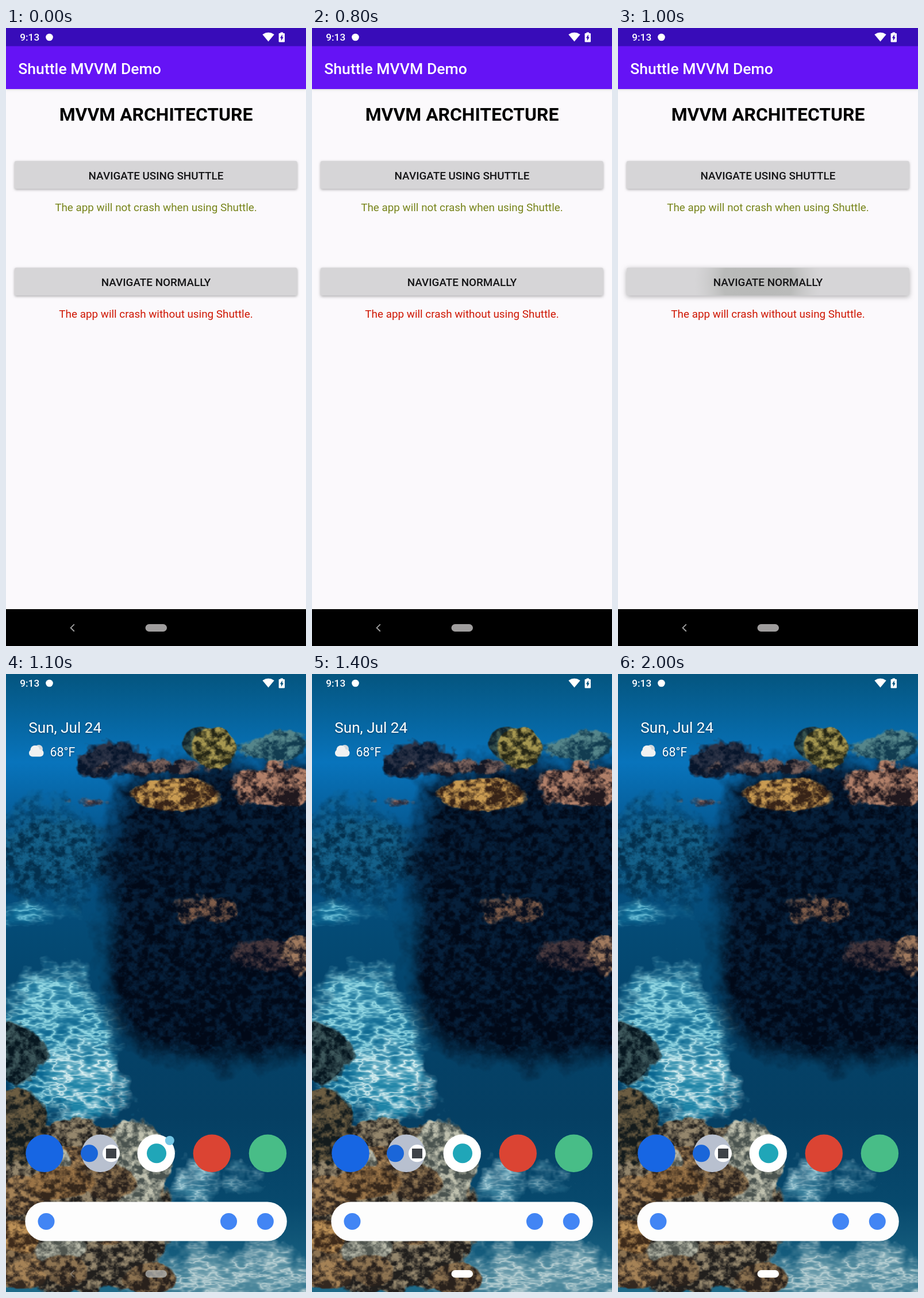
Write an HTML page with a canvas that moves like this. It is 522x1073 px and loops after 2700 ms.

```html
<!DOCTYPE html>
<html lang="en">
<head>
<meta charset="utf-8">
<title>Navigation demo</title>
<style>
  html, body { margin: 0; width: 100%; height: 100%; overflow: hidden; background: #000; }
  canvas, svg { position: absolute; left: 0; top: 0; width: 522px; height: 1073px; }
  text { font-family: Roboto, sans-serif; white-space: pre; }
  .mid { text-anchor: middle; }
  .body { font-size: 18.85px; }
  .button { font-size: 18.85px; font-weight: 500; fill: #141416; }
  #home text { fill: #fff; filter: drop-shadow(0 1px 1.5px rgba(0, 0, 0, .4)); }
</style>
</head>
<body>
<canvas id="stage" width="522" height="1073"></canvas>
<svg viewBox="0 0 522 1073">
  <text x="24.3" y="22" font-size="17.2" font-weight="500" fill="#fff">9:13</text>
  <g id="app">
    <text x="21.3" y="80" font-size="26.6" font-weight="500" fill="#fff">Shuttle MVVM Demo</text>
    <text class="mid" x="261" y="161.4" font-size="31.9" font-weight="700">MVVM ARCHITECTURE</text>
    <text class="mid button" x="261" y="262.6">NAVIGATE USING SHUTTLE</text>
    <text class="mid body" x="261" y="318" fill="#77841a">The app will not crash when using Shuttle.</text>
    <text class="mid button" x="261" y="447.6">NAVIGATE NORMALLY</text>
    <text class="mid body" x="261" y="503" fill="#cf1703">The app will crash without using Shuttle.</text>
  </g>
  <g id="home">
    <text x="39.3" y="101.5" font-size="26.1">Sun, Jul 24</text>
    <text x="76.5" y="142.5" font-size="21.3">68°F</text>
  </g>
</svg>
<script>
const W = 522, H = 1073, LOOP = 2700, CRASH = 1100;
const stage = document.getElementById('stage');
const appText = document.getElementById('app');
const homeText = document.getElementById('home');
const ctx = stage.getContext('2d');

const clamp = v => Math.max(0, Math.min(1, v));
const mix = (a, b, t) => a + (b - a) * t;
const rgb = hex => [1, 3, 5].map(i => parseInt(hex.slice(i, i + 2), 16));

function disc(x, y, r, fill) {
  ctx.fillStyle = fill;
  ctx.beginPath();
  ctx.arc(x, y, r, 0, Math.PI * 2);
  ctx.fill();
}

function box(x, y, w, h, r, fill) {
  ctx.fillStyle = fill;
  ctx.beginPath();
  ctx.roundRect(x, y, w, h, r);
  ctx.fill();
}

function withShadow(color, blur, dy, draw) {
  ctx.save();
  ctx.shadowColor = color;
  ctx.shadowBlur = blur;
  ctx.shadowOffsetY = dy;
  draw();
  ctx.restore();
}

function random(seed) {
  return () => {
    seed = (seed * 1664525 + 1013904223) >>> 0;
    return seed / 4294967296;
  };
}

// Smooth value noise on a wrapped grid
const rnd = random(7);
const GRID = 256;
const lattice = Float32Array.from({ length: GRID * GRID }, rnd);

function noise(x, y) {
  const ix = Math.floor(x), iy = Math.floor(y);
  const ease = v => v * v * (3 - 2 * v);
  const fx = ease(x - ix), fy = ease(y - iy);
  const at = (i, j) => lattice[(j % GRID) * GRID + i % GRID];
  return mix(mix(at(ix, iy), at(ix + 1, iy), fx), mix(at(ix, iy + 1), at(ix + 1, iy + 1), fx), fy);
}

function fractal(x, y, octaves) {
  let sum = 0, total = 0;
  for (let k = 0; k < octaves; k++) {
    const amp = .55 ** k;
    sum += amp * noise(x * 2 ** k + k * 17, y * 2 ** k + k * 31);
    total += amp;
  }
  return sum / total;
}

function field(f) {
  return Float32Array.from({ length: W * H }, (_, i) => f(i % W, Math.floor(i / W)));
}

// Underwater scene in soft noisy patches, painted once
function paintReef() {
  const reef = document.createElement('canvas');
  reef.width = W;
  reef.height = H;
  const c = reef.getContext('2d');
  const water = ['#04557f', '#0874bc', '#055084', '#044a74', '#044268', '#053f63', '#07496d', '#1f6a88'];
  const g = c.createLinearGradient(0, 0, 0, H);
  water.forEach((color, i) => g.addColorStop(i / (water.length - 1), color));
  c.fillStyle = g;
  c.fillRect(0, 0, W, H);
  const image = c.getImageData(0, 0, W, H);

  const edge = field((x, y) => 3 * (fractal(x / 34, y / 34, 4) - .5));
  const grain = field((x, y) => .45 + 2.6 * (fractal(x / 9, y / 8, 3) - .5));
  const caustic = field((x, y) => (1 - Math.abs(2 * fractal(x / 24, y / 9, 3) - 1)) ** 4);

  // Rough ellipse, lit from above; a higher power makes it boxier
  function patch(x, y, rx, ry, dark, light, { rough = 12, soft = 5, power = 2, texture = grain } = {}) {
    const r = Math.min(rx, ry), reach = 1 + (rough + soft) / r;
    const a = rgb(dark), b = rgb(light);
    const x0 = Math.max(0, Math.floor(x - rx * reach)), x1 = Math.min(W, x + rx * reach);
    const y0 = Math.max(0, Math.floor(y - ry * reach)), y1 = Math.min(H, y + ry * reach);
    for (let py = y0; py < y1; py++) {
      for (let px = x0; px < x1; px++) {
        const i = py * W + px;
        const dx = Math.abs(px - x) / rx, dy = Math.abs(py - y) / ry;
        const inside = (1 - (dx ** power + dy ** power) ** (1 / power)) * r + rough * edge[i];
        const alpha = clamp(inside / soft);
        if (!alpha) continue;
        const t = clamp(texture[i] - .2 * (py - y) / ry);
        for (let k = 0; k < 3; k++) {
          const p = i * 4 + k;
          image.data[p] = mix(image.data[p], mix(a[k], b[k], t), alpha);
        }
      }
    }
  }

  const haze = { rough: 30, soft: 50 };
  const sand = { rough: 30, soft: 40, texture: caustic };

  // Water, distant reef and lit sand
  patch(60, 310, 150, 100, '#03304e', '#146089', haze);
  patch(40, 415, 75, 25, '#0b6792', '#6fc3da', { rough: 10, soft: 20, texture: caustic });
  patch(85, 650, 130, 145, '#0a6690', '#8fd5e1', sand);
  patch(130, 710, 95, 75, '#1d83a6', '#d9f0f1', sand);
  patch(350, 885, 75, 40, '#3d84a0', '#b8dce3', sand);
  patch(400, 1050, 220, 70, '#49859a', '#b9d0d3', sand);

  // Dark wall
  patch(400, 410, 250, 285, '#010918', '#06203b', { rough: 16, soft: 50, power: 4 });
  patch(185, 148, 75, 30, '#07152b', '#2c3346');
  patch(265, 160, 80, 16, '#141724', '#78605a');
  patch(460, 125, 65, 26, '#123c50', '#55858a');
  patch(465, 195, 75, 42, '#20181e', '#b18069');
  patch(148, 222, 32, 12, '#2b2c3c', '#8b6a63');

  // Corals
  const coral = { rough: 5, soft: 3 };
  patch(335, 120, 29, 30, '#10242e', '#38534f', coral);
  patch(361, 128, 41, 35, '#262716', '#a69750', coral);
  patch(299, 210, 78, 32, '#382418', '#c99b52', coral);

  // Ledges catching light
  patch(350, 410, 50, 22, '#080f1e', '#7e5c49');
  patch(450, 490, 65, 28, '#080e1f', '#49393d');
  patch(510, 485, 28, 32, '#1c1a24', '#a07a5e');

  // Foreground rocks
  patch(15, 660, 55, 62, '#071720', '#3c565a');
  patch(110, 925, 175, 150, '#211f1d', '#94866c', { power: 3 });
  patch(225, 850, 68, 75, '#4b5450', '#bfc0ae');
  patch(15, 780, 62, 70, '#141b1c', '#6c5d42');
  const tones = [['#332820', '#a58256'], ['#515650', '#b7b8a8'], ['#29211c', '#8d7351']];
  for (let i = 0; i < 15; i++) {
    const [dark, light] = tones[i % tones.length];
    const r = mix(16, 34, rnd());
    patch(rnd() * 260, mix(840, H, rnd()), r * 1.5, r, dark, light, coral);
  }
  patch(95, 885, 56, 28, '#35271b', '#9a7447', coral);
  patch(24, 976, 38, 30, '#3e2b1b', '#bd9157', coral);

  c.putImageData(image, 0, 0);
  return reef;
}

const reef = paintReef();

function statusIcons(background) {
  const white = '#fff';
  disc(75.5, 16, 6.3, white);
  ctx.beginPath();
  ctx.moveTo(456.5, 23.6);
  ctx.lineTo(446.3, 11.2);
  ctx.quadraticCurveTo(456.5, 4.3, 466.7, 11.2);
  ctx.fill();
  box(477.5, 7.4, 4.6, 3, .5, white);
  box(474.6, 9, 10.4, 15.4, 1.2, white);

  // Charging bolt: one triangle and its half turn
  ctx.fillStyle = background;
  for (const s of [1, -1]) {
    ctx.beginPath();
    ctx.moveTo(479.8 + s, 16.7 - s * 5.5);
    ctx.lineTo(479.8 - s * 3, 16.7 + s * .9);
    ctx.lineTo(479.8 + s, 16.7 + s * .9);
    ctx.fill();
  }
}

function chevron(color) {
  ctx.strokeStyle = color;
  ctx.lineWidth = 1.8;
  ctx.beginPath();
  for (const s of [-1, 0, 1]) ctx.lineTo(112.6 + 6.2 * Math.abs(s), 1041.4 + 6.1 * s);
  ctx.stroke();
}

const pill = color => box(242.5, 1035, 37.5, 13, 6.5, color);

function button(y, lift) {
  withShadow('rgba(0,0,0,.32)', 4 + lift * 4, 1.4 + lift * .6, () => box(15, y, 491.5, 48.3, 2.7, '#d6d5d7'));
}

function ripple(x, y, grow) {
  const g = ctx.createRadialGradient(x, y, 0, x, y, 50 + 60 * grow);
  g.addColorStop(0, '#b8b9b8');
  g.addColorStop(.55, '#babbba');
  g.addColorStop(1, 'rgba(200,200,200,0)');
  ctx.globalAlpha = grow;
  box(15, 416.3, 491.5, 48.3, 2.7, g);
  ctx.globalAlpha = 1;
}

function drawApp(t) {
  const bar = '#380cb9';
  ctx.fillStyle = '#fbf9fc';
  ctx.fillRect(0, 0, W, H);
  withShadow('rgba(0,0,0,.15)', 4, 1, () => box(0, 31, W, 75, 0, '#6513f5'));
  box(0, 0, W, 31.5, 0, bar);
  button(231, 0);
  button(416.3, clamp((t - 700) / 300));
  ripple(243, 440, clamp((t - 800) / 200));
  box(0, 1009, W, 64, 0, '#000');
  chevron('#a3a3a3');
  pill('#9f9d9d');
  statusIcons(bar);
}

function drawHome(t) {
  const settle = clamp((t - CRASH) / 300);
  ctx.drawImage(reef, 0, 0);
  statusIcons('#05557f');

  // Weather
  disc(57, 130, 7, '#d3d8dc');
  box(40, 131, 25.5, 12.5, 6.2, '#f1f1f1');
  disc(50.5, 132, 8, '#f1f1f1');

  // Dock
  const y = 832.3;
  ['#1766e3', '#b8c0cf', '#fff', '#db4433', '#48bd87'].forEach((color, i) => disc(67 + 97.1 * i, y, 32.7, color));
  disc(145, y, 15, '#1a66d9');
  disc(183, y, 15, '#fff');
  box(174, 824, 18, 17, 0, '#3e4247');
  disc(262, y, 17, '#20a6b8');
  disc(284.8, 810, 8 * (1 - settle), '#73c5e4');

  // Search bar
  box(33.3, 916.5, 455.5, 68, 34, '#fdfdfd');
  for (const x of [70, 387.5, 451.3]) disc(x, 950.4, 14.5, '#4285f4');

  chevron(`rgba(200,200,200,${.35 * (1 - settle)})`);
  pill(`rgba(${[200, 205, 205].map(v => mix(v, 255, settle))},${mix(.65, 1, settle)})`);
}

function frame(now) {
  const t = Math.floor(now % LOOP / 100) * 100;
  const inApp = t < CRASH;
  appText.style.display = inApp ? '' : 'none';
  homeText.style.display = inApp ? 'none' : '';
  (inApp ? drawApp : drawHome)(t);
  requestAnimationFrame(frame);
}
frame(performance.now());
</script>
</body>
</html>
```
